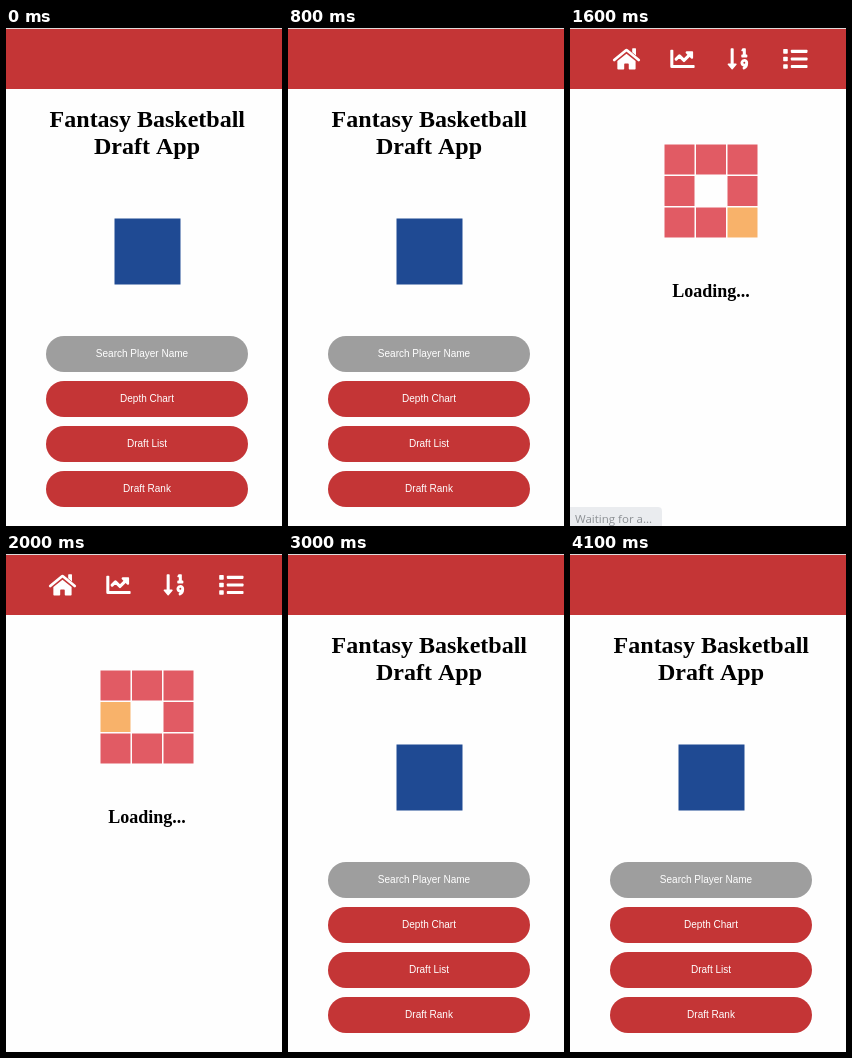
An HTML page with a canvas for the animation above (4200 ms loop, 276 px wide and 498 px high).

```html
<!DOCTYPE html>
<html lang="en">
<head>
<meta charset="utf-8">
<title>Fantasy Basketball Draft App</title>
<style>
  html, body { margin: 0; width: 100%; height: 100%; overflow: hidden; background: #fefefe; }
  canvas { display: block; width: 276px; height: 498px; }
</style>
</head>
<body>
<canvas id="stage"></canvas>
<script>
const W = 276, H = 498, MID = 141;
const LOOP = 4200, TICK = 100;
const LOAD_AT = 1000, ICONS_AT = 1300, HOME_AT = 2700;
const FADE_AT = 1500, FADE_MS = 250;
const TILE_STEP = 140;
const RED = '#c43536', GREY = '#9e9e9e';
const SERIF = '"Liberation Serif", "Times New Roman", serif';
const SANS = '"Liberation Sans", Arial, sans-serif';

const canvas = document.getElementById('stage');
const ctx = canvas.getContext('2d');
const ratio = window.devicePixelRatio || 1;
canvas.width = W * ratio;
canvas.height = H * ratio;

function box(x, y, w, h, color, radius = 0) {
  ctx.fillStyle = color;
  ctx.beginPath();
  ctx.roundRect(x, y, w, h, radius);
  ctx.fill();
}

function label(str, x, y, font, color, align = 'center') {
  ctx.font = font;
  ctx.fillStyle = color;
  ctx.textAlign = align;
  ctx.fillText(str, x, y);
}

function pill(str, y, color, x = MID) {
  box(40, y, 202, 36, color, 18);
  label(str, x, y + 21, '10px ' + SANS, '#fff');
}

function drawHome() {
  label('Fantasy Basketball', MID + 0.3, 99, 'bold 24px ' + SERIF, '#000');
  label('Draft App', MID, 126, 'bold 24px ' + SERIF, '#000');
  box(108.5, 190.5, 66, 66, '#1f4a93');
  pill('Search Player Name', 308, GREY, 136);
  pill('Depth Chart', 353, RED);
  pill('Draft List', 398, RED);
  pill('Draft Rank', 443, RED);
}

// Clockwise ring of eight tiles, top left first
const ring = [[0, 0], [1, 0], [2, 0], [2, 1], [2, 2], [1, 2], [0, 2], [0, 1]];

function drawLoading(t) {
  const lit = Math.floor((t - LOAD_AT) / TILE_STEP) % ring.length;
  ring.forEach(([col, row], i) => {
    box(94.5 + col * 31.5, 116.5 + row * 31.5, 30, 30, i === lit ? '#f8b26a' : '#e15b64');
  });
  label('Loading...', MID, 269, 'bold 18px ' + SERIF, '#000');
}

function drawStatus(t) {
  const alpha = 1 - Math.max(0, t - FADE_AT) / FADE_MS;
  if (alpha <= 0) return;
  ctx.globalAlpha = alpha;
  box(0, 479, 92, 19, '#dee1e6', [0, 4, 0, 0]);
  label('Waiting for a...', 5, 495, '11.5px "Open Sans", sans-serif', '#4d5156', 'left');
  ctx.globalAlpha = 1;
}

// Icons are drawn on a 512-unit grid
const icons = [
  { x: 42.8, draw: houseIcon },
  { x: 100.3, draw: chartIcon },
  { x: 157.6, draw: sortIcon },
  { x: 213.2, draw: listIcon }
];

function fillPath(d) {
  ctx.fill(new Path2D(d), 'evenodd');
}

function strokePath(d, width) {
  ctx.lineWidth = width;
  ctx.stroke(new Path2D(d));
}

function houseIcon() {
  fillPath('M288 146L96 300V464Q96 480 112 480H224Q240 480 240 464V368Q240 352 256 352H320Q336 352 336 368V464Q336 480 352 480H464Q480 480 480 464V300Z');
  fillPath('M408 117V44Q408 32 420 32H476Q488 32 488 44V183Z');
  strokePath('M30 277L273 77Q288 65 303 77L546 277', 58);
}

function chartIcon() {
  fillPath('M16 64H48Q64 64 64 80V384H496Q512 384 512 400V432Q512 448 496 448H32Q0 448 0 416V80Q0 64 16 64Z');
  strokePath('M123 260L192 192L288 288L416 160', 66);
  fillPath('M346 96H464Q480 96 480 112V230C480 251 454 262 439 247L329 137C314 122 325 96 346 96Z');
}

function sortIcon() {
  fillPath('M80 32H112Q128 32 128 48V352H176C190 352 197 369 187 379L107 475Q96 486 85 475L5 379C-5 369 2 352 16 352H64V48Q64 32 80 32Z');
  fillPath('M304 96H320V160H304Q288 160 288 176V208Q288 224 304 224H400Q416 224 416 208V176Q416 160 400 160H384V48Q384 32 368 32H320Q310 32 306 41L290 73Q284 96 304 96Z');
  fillPath('M352 256C404 256 432 294 432 336V347C432 417 404 454 346 479Q331 484 325 469L315 449Q312 435 323 428Q335 423 344 416C297 411 261 364 275 313Q293 256 352 256ZM352 316A20 20 0 1 0 352 356A20 20 0 1 0 352 316Z');
}

function listIcon() {
  for (let y = 48; y < 400; y += 160) {
    box(0, y, 96, 96, '#fff', 16);
    box(160, y + 16, 352, 64, '#fff', 16);
  }
}

function drawIcons() {
  for (const { x, draw } of icons) {
    ctx.save();
    ctx.translate(x, 18.8);
    ctx.scale(0.0475, 0.0475);
    ctx.fillStyle = ctx.strokeStyle = '#fff';
    ctx.lineCap = ctx.lineJoin = 'round';
    draw();
    ctx.restore();
  }
}

function render(t) {
  ctx.setTransform(ratio, 0, 0, ratio, 0, 0);
  box(0, 0, W, H, '#fefefe');
  box(0, 0, W, 1, '#dfd9da');
  box(0, 1, W, 60, RED);
  if (t < LOAD_AT || t >= HOME_AT) {
    drawHome();
    return;
  }
  drawLoading(t);
  drawStatus(t);
  if (t >= ICONS_AT) drawIcons();
}

const start = performance.now();

function frame() {
  const t = (performance.now() - start) % LOOP;
  render(Math.floor(t / TICK) * TICK);
  requestAnimationFrame(frame);
}

frame();
</script>
</body>
</html>
```
